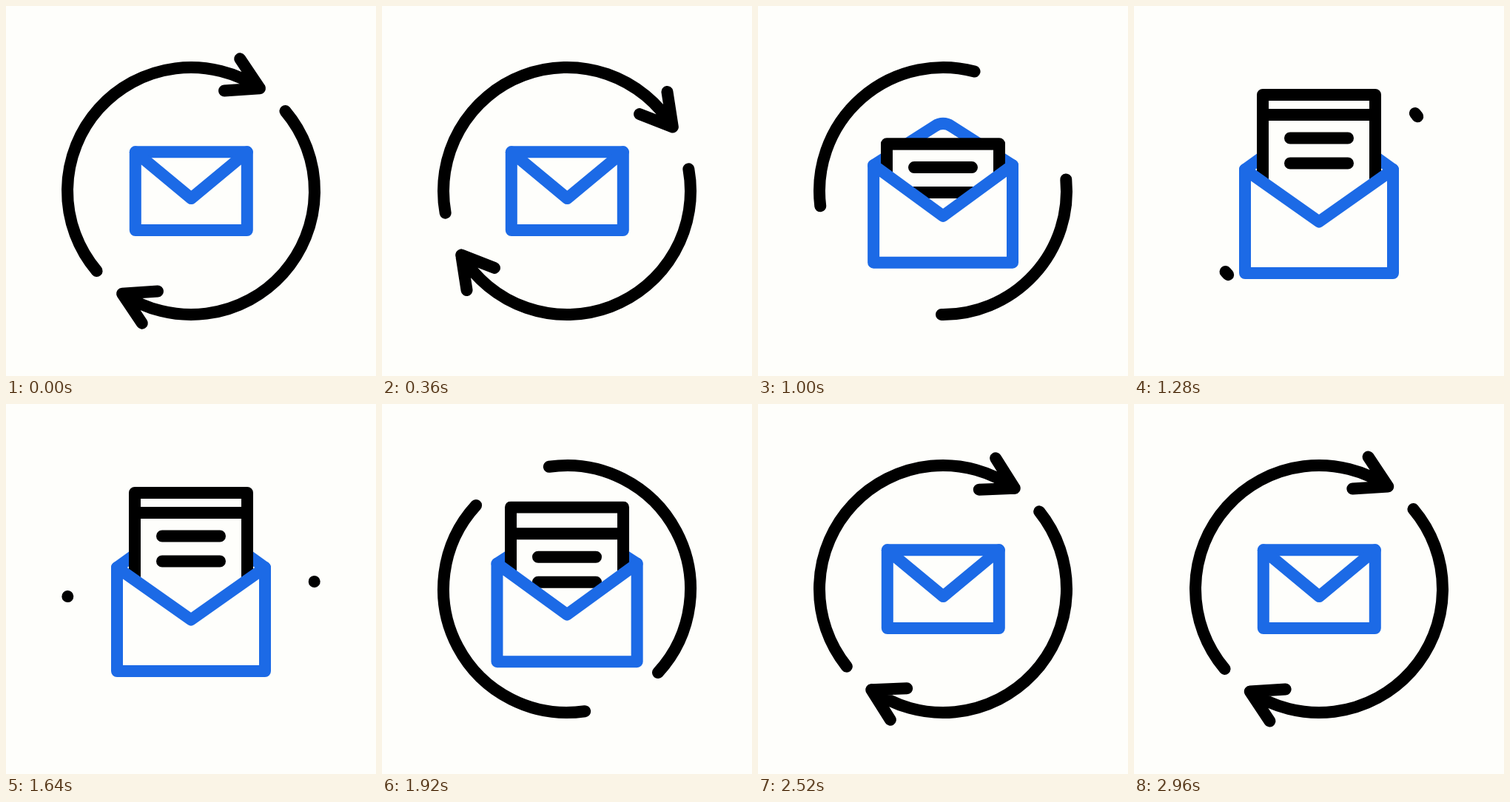
An HTML page that plays this animation: 500x500 px, repeating every 3 s.

```html
<!DOCTYPE html>
<html lang="en">
<head>
<meta charset="utf-8">
<title>Mail refresh</title>
<style>
  html, body { margin: 0; width: 100%; height: 100%; overflow: hidden; background: #fefefb; }
  svg { display: block; width: 100vw; height: 100vh; }
  path { fill: none; stroke: #000; stroke-width: 16; stroke-linecap: round; stroke-linejoin: round; }
  .blue { stroke: #1c6ae6; }
  .paper { fill: #fefefb; }
</style>
</head>
<body>
<svg viewBox="0 0 500 500">
  <clipPath id="slot"><rect id="slotBox"/></clipPath>
  <path id="arcA"/>
  <path id="arcB"/>
  <path id="flap" class="blue"/>
  <g id="letter" clip-path="url(#slot)">
    <path id="sheet" class="paper"/>
    <path id="lines"/>
  </g>
  <path id="front" class="blue paper"/>
</svg>
<script>
const LOOP = 3000, STEP = 40, C = 250, R = 167;
const el = id => document.getElementById(id);
const draw = (id, d) => el(id).setAttribute('d', d);
const show = (id, on) => el(id).style.display = on ? '' : 'none';

const span = (t, from, to) => Math.min(1, Math.max(0, (t - from) / (to - from)));
const easeOut = (t, from, to) => 1 - (1 - span(t, from, to)) ** 3;
function ease(t, from, to) {
  const u = span(t, from, to);
  return u < .5 ? 4 * u ** 3 : 1 - 4 * (1 - u) ** 3;
}

const polar = (x, y, r, deg) => {
  const a = deg * Math.PI / 180;
  return [x + r * Math.cos(a), y + r * Math.sin(a)];
};

function arrow(id, tail, head, barb) {
  const tip = polar(C, C, R, head);
  let d = `M${polar(C, C, R, tail)}A${R} ${R} 0 0 1 ${tip}`;
  if (barb > .5) {
    const [a, b] = [-30, 30].map(s => polar(...tip, barb, head - 97.6 + s));
    d += `M${a}L${tip}L${b}`;
  }
  draw(id, d);
}

// A slow backward drift runs under both spins.
function spinOut(id, t, turn, tailFrom, headTo, lag) {
  const start = turn - t / 300, nudge = ease(t, 100, 660);
  const tail = start - 40.3 + 78.1 * nudge + (287.5 - lag) * ease(t, tailFrom, tailFrom + 490);
  const head = start + 123.8 + 65.4 * nudge + (138 - lag) * ease(t, 660, headTo);
  arrow(id, tail, head, 48 * (1 - ease(t, 600, 880)));
}

function spinIn(id, t, turn) {
  const start = turn + (LOOP - t) / 300 - 8;
  const tail = start + 147.6 * ease(t, 1695, 2120);
  const head = start + 311.8 * ease(t, 1630, 2120);
  arrow(id, tail, head, 48 * easeOut(t, 2050, 2480));
}

function arrows(t) {
  const leaving = t < 1300, on = leaving || t >= 1640;
  show('arcA', on);
  show('arcB', on);
  if (leaving) {
    spinOut('arcA', t, 0, 758, 1240, 0);
    spinOut('arcB', t, 180, 756, 1280, 3.7);
  } else if (on) {
    spinIn('arcA', t, 0);
    spinIn('arcB', t, 180);
  }
}

// 0 when shut, 1 when open; all parts shut together.
const lift = (t, from) => ease(t, from, 1282) - ease(t, 1660, 2343);

function envelope(t) {
  const p = lift(t, 569), mid = 250.3 - .3 * p;
  const half = 75.5 + 24.5 * p, left = mid - half, right = mid + half;
  const y = 197.3 + 23.7 * p, bottom = 303 + 58 * p, vee = 260 + 31.5 * p;

  const rise = 72 * p ** .65, round = (1 - p) ** 1.5;
  const bend = half * round, bendY = y - rise * (1 - round);
  draw('flap', `M${left} ${y}L${mid - bend} ${bendY}Q${mid} ${y - rise} ${mid + bend} ${bendY}L${right} ${y}`);
  draw('front', `M${left} ${y}L${mid} ${vee}L${right} ${y}V${bottom}H${left}Z`);

  const on = t >= 820 && t < 2200;
  show('letter', on);
  if (!on) return;
  const top = 208 - 88 * lift(t, 816), row = 275 - 128 * lift(t, 620);
  const box = { x: left - .5, y: top - 8, width: 2 * half + 1, height: vee - top + 8 };
  for (const key in box) el('slotBox').setAttribute(key, box[key]);
  draw('sheet', `M174 310V${top}H326V310`);
  draw('lines', `M174 ${row}H326M211 ${row + 31.5}H289M211 ${row + 65.5}H289`);
}

function frame() {
  const t = Math.floor(performance.now() % LOOP / STEP) * STEP;
  arrows(t);
  envelope(t);
  requestAnimationFrame(frame);
}
frame();
</script>
</body>
</html>
```
